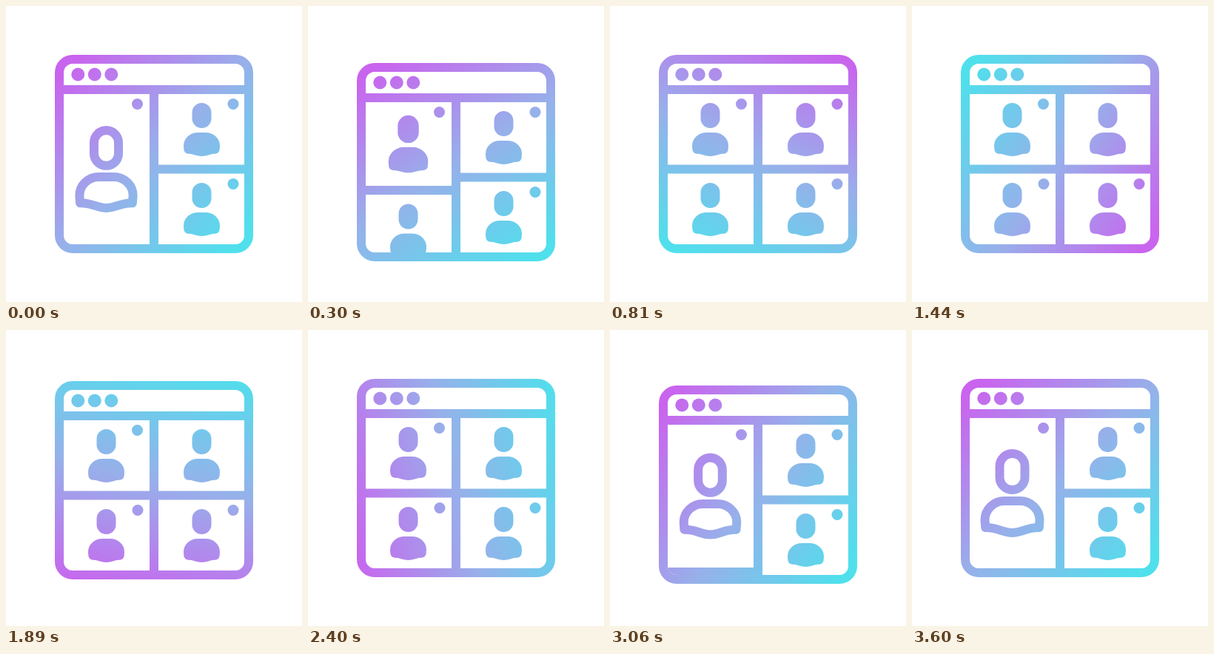
An HTML page with a canvas that plays this animation: 400 px wide and 400 px high, repeating every 3660 ms.

```html
<!DOCTYPE html>
<html lang="en">
<head>
<meta charset="utf-8">
<title>Video call grid</title>
<style>
  html, body { margin: 0; width: 100%; height: 100%; overflow: hidden; background: #fff; }
  canvas { display: block; width: 400px; height: 400px; }
</style>
</head>
<body>
<canvas id="stage" width="400" height="400"></canvas>
<script>
const ctx = document.getElementById('stage').getContext('2d');
const LOOP = 3660, GROW_START = 2712, GROW_TIME = 580;
const STROKE = 12, LEFT = 135.5, RIGHT = 264.5, ROW = 108, GRID_Y = 220.5;

const clamp = x => Math.max(0, Math.min(1, x));
const smooth = x => x * x * (3 - 2 * x);
const ease = (x, start, end) => (1 - (1 - clamp(x)) ** end) ** start;

// Rises to height, then settles back to zero
const bump = (t, start, rise, fall, height) =>
  height * smooth(clamp((t - start) / rise)) * smooth(clamp(1 - (t - start - rise) / fall));

const dip = t => bump(t, 20, 230, 500, 11) + bump(t, 1660, 230, 330, 3)
               + bump(t, GROW_START, 230, 500, 11);

// 1 = large speaker tile, 0 = even grid
const enlargement = t => t < LOOP / 2
  ? 1 - ease(t / GROW_TIME, 1.5, 3)
  : ease((t - GROW_START) / GROW_TIME, 1.5, 3);

function gradient(turn) {
  const a = Math.PI / 4 + turn * 2 * Math.PI;
  const x = 165 * Math.cos(a), y = 165 * Math.sin(a);
  const g = ctx.createLinearGradient(200 - x, 200 - y, 200 + x, 200 + y);
  g.addColorStop(0, '#c964ee');
  g.addColorStop(.5, '#97b0ea');
  g.addColorStop(1, '#4fe0ec');
  return g;
}

function line(x1, y1, x2, y2) {
  ctx.beginPath();
  ctx.moveTo(x1, y1);
  ctx.lineTo(x2, y2);
  ctx.stroke();
}

function dot(x, y, r = 7.5) {
  ctx.beginPath();
  ctx.arc(x, y, r, 0, 7);
  ctx.fill();
}

function paint(fill) {
  ctx.globalAlpha = fill;
  ctx.fill();
  ctx.globalAlpha = 1;
  ctx.stroke();
}

// grow: 0 = small tile, 1 = large speaker
function person(cx, cy, grow = 0, fill = 1) {
  const top = cy - (72 + 47 * grow) / 2;
  const headW = 14 + 20 * grow, headH = 22 + 27 * grow;
  ctx.beginPath();
  ctx.roundRect(cx - headW / 2, top + 6, headW, headH, headW / 2);
  paint(fill);

  const w = 37 + 37 * grow, h = 20 + 23 * grow;
  const left = cx - w / 2, y0 = top + headH + 24 - 3 * grow;
  const X = u => left + u * w, Y = v => y0 + v * h;
  const curve = (a, b, c, d, e, f) => ctx.bezierCurveTo(X(a), Y(b), X(c), Y(d), X(e), Y(f));
  ctx.beginPath();
  ctx.moveTo(X(0), Y(.6));
  curve(0, .27, .16, 0, .36, 0);
  ctx.lineTo(X(.64), Y(0));
  curve(.84, 0, 1, .27, 1, .6);
  ctx.lineTo(X(.99), Y(.84));
  curve(.78, .82, .68, 1, .5, 1);
  curve(.32, 1, .22, .82, .01, .84);
  ctx.closePath();
  paint(fill);
}

function draw(t) {
  const large = enlargement(t), grow = enlargement(t + 25);
  const shift = (ROW - .5) * large;
  const muted = Math.floor(t / LOOP * 3); // 0 lower left, 1 upper right, 2 upper left

  ctx.clearRect(0, 0, 400, 400);
  ctx.save();
  ctx.translate(0, Math.round(dip(t)));
  ctx.fillStyle = ctx.strokeStyle = gradient(ease(t / LOOP, 2, 2.3));
  ctx.lineWidth = STROKE;
  ctx.lineJoin = 'round';

  ctx.beginPath();
  ctx.roundRect(72, 72, 256, 256, 18);
  ctx.stroke();
  for (let i = 0; i < 3; i++) dot(97.3 + 22.5 * i, 92.5, 9);
  line(72, 113, 328, 113);
  line(200, 113, 200, 328);
  line(200, GRID_Y, 328, GRID_Y);

  person(RIGHT, 167);
  person(RIGHT, 167 + ROW);
  if (muted !== 1) dot(307, 132.5);
  dot(307, 132.5 + ROW);

  person(LEFT, 167 + 53.5 * large, grow, 1 - clamp((large - .45) / .3));
  if (muted !== 2 || large > .6) dot(177.5, 132.5);

  // The lower left tile slides out beneath the frame
  ctx.beginPath();
  ctx.roundRect(78, 78, 244, 244, 12);
  ctx.clip();
  line(72, GRID_Y + shift, 200, GRID_Y + shift);
  person(LEFT, 167 + ROW + shift);
  if (muted !== 0) dot(178, 132.5 + ROW + shift);
  ctx.restore();
}

function frame() {
  draw(performance.now() % LOOP);
  requestAnimationFrame(frame);
}
frame();
</script>
</body>
</html>
```
